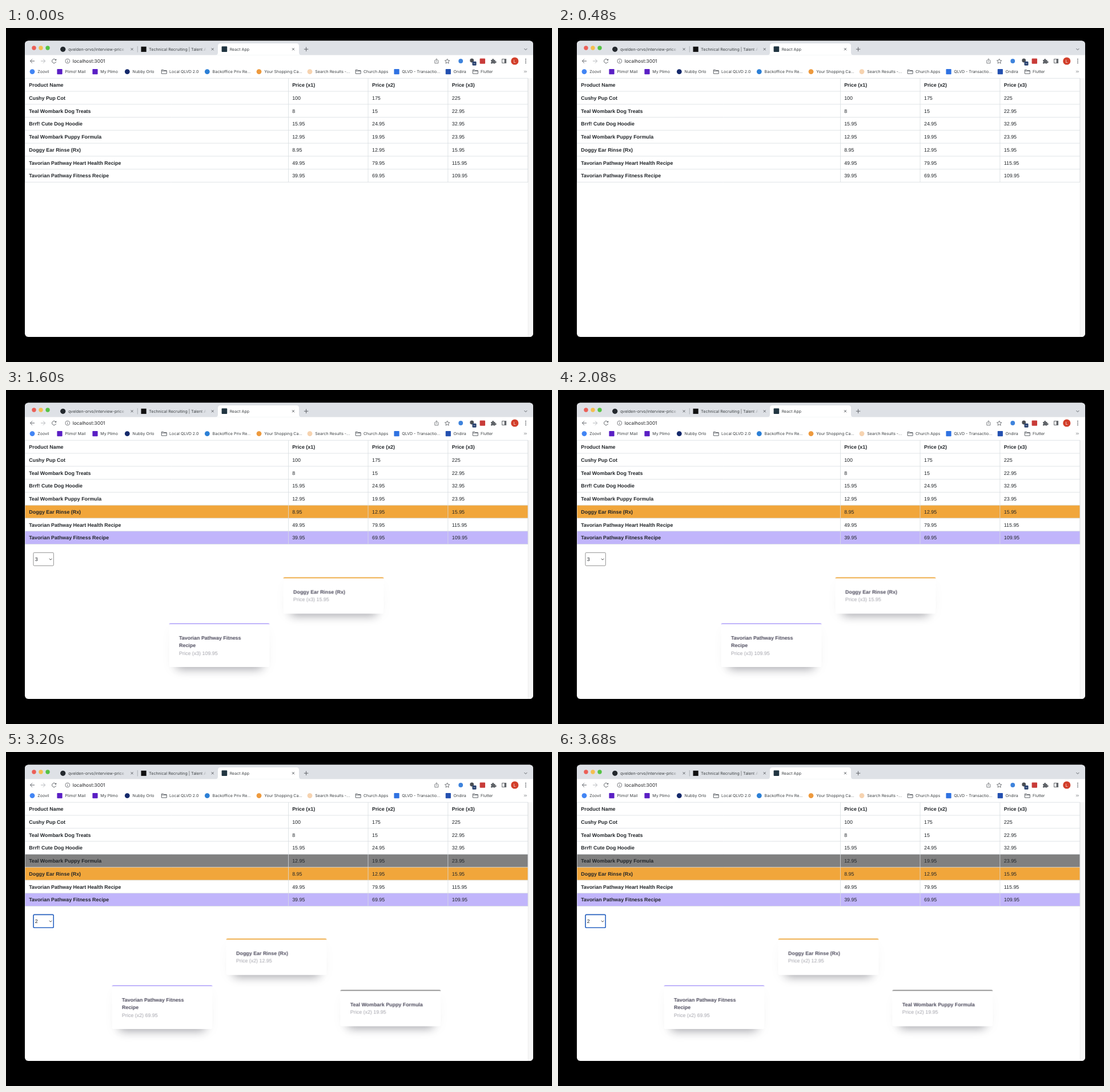
Write an HTML page that moves like this. It is 956 px wide and 586 px high and loops after 4 s.

```html
<!DOCTYPE html>
<html lang="en">
<head>
<meta charset="utf-8">
<title>Price table</title>
<style>
html, body { margin: 0; width: 100%; height: 100%; overflow: hidden; background: #000; }
#stage { position: relative; width: 956px; height: 586px; overflow: hidden; text-rendering: geometricPrecision; }
svg { position: absolute; left: 0; top: 0; }
.ui { font: 7.05px Inter, Roboto, sans-serif; fill: #3c4043; }
.table { font: 8.89px "Liberation Sans", Arial, sans-serif; fill: #212529; }
.line { fill: none; stroke: #5f6368; stroke-width: 1; }
.bold { font-weight: 700; }

.from1, .from2, .from3, .from4, .until4, .card { animation: 4s step-end infinite; }
.from1 { animation-name: from1; }
.from2 { animation-name: from2; }
.from3 { animation-name: from3; }
.from4 { animation-name: from4; }
.until4 { animation-name: until4; }
@keyframes from1 { 0% { opacity: 0 } 20%, 100% { opacity: 1 } }
@keyframes from2 { 0% { opacity: 0 } 40%, 100% { opacity: 1 } }
@keyframes from3 { 0% { opacity: 0 } 60%, 100% { opacity: 1 } }
@keyframes from4 { 0% { opacity: 0 } 80%, 100% { opacity: 1 } }
@keyframes until4 { 0% { opacity: 1 } 80%, 100% { opacity: 0 } }

.card {
  position: absolute; left: 0; top: 0; width: 176px; box-sizing: border-box;
  padding: 17.8px 17.6px 17.4px; border-top: 2px solid; border-radius: 2.5px; background: #fff;
  font: 8.89px/13.4px "Liberation Sans", Arial, sans-serif; white-space: nowrap;
  box-shadow: 0 16.7px 16.7px -13.9px rgba(30, 30, 45, .4), 0 8px 22px -2px rgba(30, 30, 45, .035);
}
.card b { display: block; color: #4c4a5c; }
.card p { position: relative; margin: 0; height: 13.4px; color: #a3a3ab; }
.card span { position: absolute; left: 0; }
.fitness { border-color: #c1b5fb; animation-name: fitness; }
.drops { border-color: #efae4c; animation-name: drops; }
.formula { border-color: #999; animation-name: formula; }
@keyframes fitness {
  0% { opacity: 0; transform: translate(385.5px, 409px) }
  20% { opacity: 1; transform: translate(385.5px, 409px) }
  40% { opacity: 1; transform: translate(285.5px, 409px) }
  60%, 100% { opacity: 1; transform: translate(185.5px, 409px) }
}
@keyframes drops {
  0% { opacity: 0; transform: translate(485.5px, 328.4px) }
  40% { opacity: 1; transform: translate(485.5px, 328.4px) }
  60%, 100% { opacity: 1; transform: translate(385.5px, 327.2px) }
}
@keyframes formula {
  0% { opacity: 0; transform: translate(585.3px, 417.2px) }
  60%, 100% { opacity: 1; transform: translate(585.3px, 417.2px) }
}
</style>
</head>
<body>
<div id="stage">
<svg width="956" height="586" viewBox="0 0 956 586">
  <defs>
    <clipPath id="window"><rect x="33" y="22.5" width="890" height="519.5" rx="6"/></clipPath>
    <linearGradient id="fade">
      <stop offset="0" stop-color="#dee1e6" stop-opacity="0"/>
      <stop offset=".6" stop-color="#dee1e6"/>
    </linearGradient>
    <g id="close"><path class="line" d="M-2-2 2 2M2-2-2 2"/></g>
    <path id="folder" class="line" d="M-4.5-3.2h3.4l1.1 1.3h4.5v5.4h-9zM-4.5-1.2h9"/>
  </defs>
  <g clip-path="url(#window)">
    <rect x="33" y="22" width="890" height="520" fill="#fff"/>
    <rect x="33" y="22" width="890" height="25.5" fill="#dee1e6"/>
    <path d="M366.5 47.5q4.5 0 4.5-4.5V31.5q0-4.5 4.5-4.5h133q4.5 0 4.5 4.5V43q0 4.5 4.5 4.5z" fill="#fff"/>
    <circle cx="49" cy="35" r="3.7" fill="#ec5f57"/>
    <circle cx="61" cy="35" r="3.7" fill="#f5be4f"/>
    <circle cx="73" cy="35" r="3.7" fill="#55c345"/>

    <circle cx="99.7" cy="37.3" r="4.6" fill="#24292e"/>
    <rect x="236.5" y="32.7" width="9.2" height="9.2" fill="#111"/>
    <rect x="377.6" y="32.3" width="9.6" height="9.6" rx="1" fill="#203541"/>
    <g class="ui">
      <text x="109" y="39.8">qvelden-orvo/interview-price</text>
      <text x="250.3" y="39.8">Technical Recruiting | Talent A</text>
      <text x="391.7" y="39.8">React App</text>
      <text x="116.7" y="60.9" font-size="8.3" fill="#202124">localhost:3001</text>
    </g>
    <rect x="198" y="31" width="19" height="13" fill="url(#fade)"/>
    <rect x="340" y="31" width="18" height="13" fill="url(#fade)"/>
    <path d="M230.3 32v10.5" stroke="#9a9da2" stroke-width=".7"/>
    <use href="#close" x="220.6" y="37.2"/>
    <use href="#close" x="361.7" y="37.2"/>
    <use href="#close" x="503" y="37.2"/>
    <g class="line">
      <path d="M525.6 33.5v7.4M521.9 37.2h7.4M907.4 36l2.5 2.5 2.5-2.5"/>
      <path d="M50 58h-7.6M46 54.4 42.4 58l3.6 3.6"/>
      <path d="M61 58h7.6M65 54.4l3.6 3.6-3.6 3.6" stroke="#b4b7ba"/>
      <path d="M86.8 55.6a3.6 3.6 0 1 0 .8 3.4"/>
      <circle cx="107.8" cy="58" r="3.9" stroke-width=".8"/>
      <path d="M107.8 57.6v2.5M107.8 55.7v1"/>
      <path d="M752 56.8h-1.2v5h6v-5h-1.2M753.8 59.5v-5.4M752 55.7l1.8-1.8 1.8 1.8" stroke-width=".8"/>
      <path d="M772.6 54l1.2 2.8 3 .3-2.3 2 .7 3-2.6-1.6-2.6 1.6.7-3-2.3-2 3-.3z" stroke-width=".9"/>
      <rect x="868.6" y="54.6" width="7" height="6.8"/>
    </g>
    <rect x="872.6" y="54.6" width="3" height="6.8" fill="#5f6368"/>
    <path d="M88.2 53.9v3.2H85z" fill="#5f6368"/>
    <circle cx="796.2" cy="58" r="3.9" fill="#3e83dc"/>
    <circle cx="815.7" cy="57" r="3.4" fill="#4b4f54"/>
    <rect x="816.5" y="58.8" width="7" height="7" rx="1.3" fill="#27406f"/>
    <path d="M818.6 62.3h2.8" stroke="#fff" stroke-width=".7"/>
    <rect x="829.6" y="53.4" width="9.4" height="9.4" rx="1" fill="#c83b39"/>
    <path d="M849 56h2.3a1.5 1.5 0 1 1 2.8 0h2.4v2.4a1.5 1.5 0 1 1 0 2.6v1.6H853.800a1.300 1.300 0 0 0-2.500 0H849v-2.300a1.400 1.400 0 0 0 0-2.600z" fill="#5f6368"/>
    <circle cx="890.8" cy="58" r="6.6" fill="#d23f2b"/>
    <text class="ui" x="890.8" y="60.6" text-anchor="middle" style="fill:#fff">L</text>
    <g fill="#5f6368">
      <circle cx="910" cy="54.7" r=".95"/><circle cx="910" cy="58" r=".95"/><circle cx="910" cy="61.3" r=".95"/>
    </g>

    <g id="bookmarks" class="ui"></g>
    <path d="M907.3 74.800l1.500 1.700-1.500 1.700M909.800 74.800l1.500 1.700-1.500 1.700" class="line" style="stroke-width:.8"/>

    <rect x="914" y="88" width="9" height="454" fill="#f7f7f7"/>
    <path d="M914.2 88v454" stroke="#e6e6e6" stroke-width=".6"/>
    <g id="table" class="table"></g>

    <g class="from1 table">
      <rect x="48" y="285.300" width="35.300" height="23" rx="1.500" fill="#fff" stroke="#767676" stroke-width=".8"/>
      <rect class="from4" x="48.100" y="285.400" width="35.100" height="22.800" rx="1.800" fill="#fff" stroke="#2d66c4" stroke-width="1.600"/>
      <text class="until4" x="50.700" y="300.100">3</text>
      <text class="from4" x="50.700" y="300.100">2</text>
      <path d="M75.800 295.800l2.300 2.300 2.300-2.300" fill="none" stroke="#333" stroke-width=".9"/>
    </g>
  </g>
</svg>

<div class="card fitness"><b>Tavorian Pathway Fitness<br>Recipe</b>
  <p><span class="until4">Price (x3) 109.95</span><span class="from4">Price (x2) 69.95</span></p></div>
<div class="card drops"><b>Doggy Ear Rinse (Rx)</b>
  <p><span class="until4">Price (x3) 15.95</span><span class="from4">Price (x2) 12.95</span></p></div>
<div class="card formula"><b>Teal Wombark Puppy Formula</b>
  <p><span class="until4">Price (x3) 23.95</span><span class="from4">Price (x2) 19.95</span></p></div>
</div>

<script>
const circle = (x, color) => `<circle cx="${x}" cy="76.6" r="4.4" fill="${color}"/>`;
const square = (x, color) => `<rect x="${x - 4.6}" y="72" width="9.2" height="9.2" rx=".8" fill="${color}"/>`;
const folder = x => `<use href="#folder" x="${x}" y="76.6"/>`;

const bookmarks = [
  [46, circle, 'Zoovil', '#4285f4'],
  [94, square, 'Plimo! Mail', '#5a1fc4'],
  [156, square, 'My Plimo', '#5a1fc4'],
  [212.3, circle, 'Nubby Orlo', '#14296b'],
  [276.8, folder, 'Local QLVD 2.0'],
  [352.3, circle, 'Backoffice Priv Re...', '#2b7fd6'],
  [443, circle, 'Your Shopping Ca...', '#ee9a3d'],
  [532, circle, 'Search Results -...', '#f6d3b0'],
  [616.6, folder, 'Church Apps'],
  [684, square, 'QLVD - Transactio...', '#2f72e2'],
  [774.3, square, 'Ondira', '#2350b0'],
  [821.8, folder, 'Flutter'],
];
document.getElementById('bookmarks').innerHTML = bookmarks.map(([x, icon, label, color]) =>
  `${icon(x, color)}<text x="${x + 9.3}" y="79.2">${label}</text>`).join('');

const columns = [40.3, 501.2, 641, 780.8];
const rows = [
  ['Product Name', 'Price (x1)', 'Price (x2)', 'Price (x3)'],
  ['Cushy Pup Cot', '100', '175', '225'],
  ['Teal Wombark Dog Treats', '8', '15', '22.95'],
  ['Brrf! Cute Dog Hoodie', '15.95', '24.95', '32.95'],
  ['Teal Wombark Puppy Formula', '12.95', '19.95', '23.95'],
  ['Doggy Ear Rinse (Rx)', '8.95', '12.95', '15.95'],
  ['Tavorian Pathway Heart Health Recipe', '49.95', '79.95', '115.95'],
  ['Tavorian Pathway Fitness Recipe', '39.95', '69.95', '109.95'],
];
const marks = { 4: ['from3', '#808080'], 5: ['from2', '#f1a63b'], 7: ['from1', '#c1b5fb'] };
const top0 = 88.3, pitch = 22.77;

const fills = Object.entries(marks).map(([i, [cls, color]]) =>
  `<rect class="${cls}" x="33" y="${top0 + i * pitch}" width="881" height="${pitch}" fill="${color}"/>`);
const cells = rows.flatMap((row, i) => row.map((text, j) =>
  `<text class="${i && j ? '' : 'bold'}" x="${columns[j]}" y="${103 + i * pitch}">${text}</text>`));
let grid = '';
for (let i = 0; i <= rows.length; i++) grid += `M33 ${top0 + i * pitch}H914`;
for (const x of [33.3, 494.5, 634, 773.8, 913.8]) grid += `M${x} ${top0}V${top0 + rows.length * pitch}`;
document.getElementById('table').innerHTML =
  fills.join('') + `<path d="${grid}" stroke="#d9dde1" stroke-width=".8"/>` + cells.join('');
</script>
</body>
</html>
```
